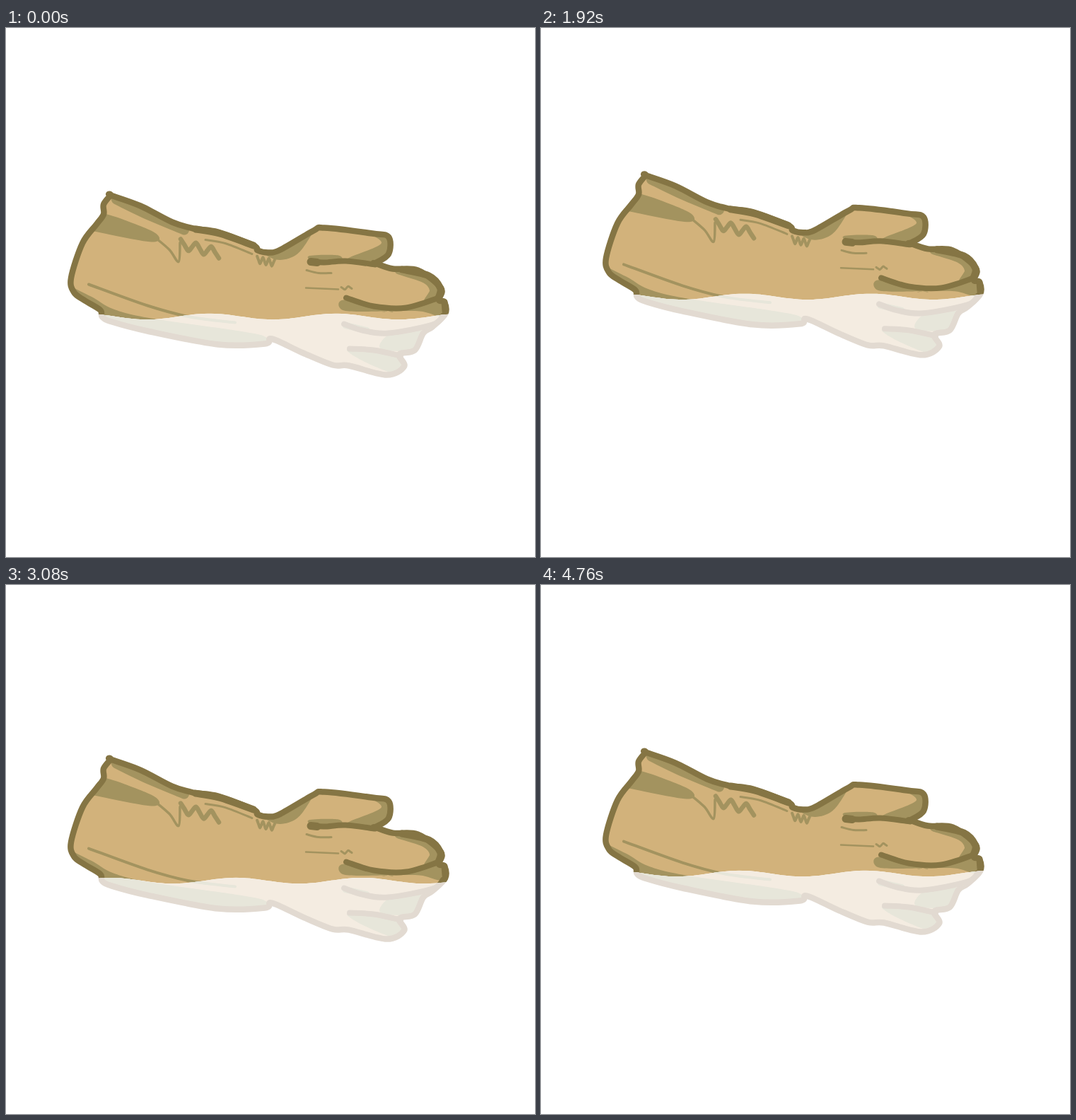
Write an HTML page that moves like this. It is 748x748 px and loops after 4800 ms.

```html
<!DOCTYPE html>
<html lang="en">
<head>
<meta charset="utf-8">
<title>Floating hand</title>
<style>
  html, body { margin: 0; width: 100%; height: 100%; overflow: hidden; background: #fff; }
  svg { display: block; width: 100%; height: 100%; }
  .dry { --skin: #d2b27b; --shade: #a3935f; --line: #857544; }
  .wet { --skin: #f4ece1; --shade: #e7e6da; --line: #e2dad1; }
  path { stroke-linecap: round; stroke-linejoin: round; }
</style>
</head>
<body>
<svg viewBox="0 0 748 748">
  <defs>
    <g id="hand"><g id="inside" clip-path="url(#body)"></g></g>
    <clipPath id="body"></clipPath>
    <clipPath id="water"><path id="surface"/></clipPath>
  </defs>
  <g id="float">
    <use href="#hand" class="dry"/>
    <g clip-path="url(#water)">
      <rect y="380" width="748" height="160" fill="#fff"/>
      <use href="#hand" class="wet"/>
    </g>
  </g>
</svg>
<script>
const LOOP = 4800, STEP = 40;
const WAVE = { length: 178, period: 960, crest: 288, level: 407.5, height: 4.2 };
// Bobbing: time, vertical offset
const BOB = [[0, 0.5], [1690, -29.5], [3460, 15.5], [4800, 0.5]];

const $ = id => document.getElementById(id);

// Smooth path through points; a repeated point makes a corner.
function curve(text, closed) {
  const p = text.trim().split(/\s+/).map(s => s.split(',').map(Number));
  const n = p.length;
  const at = i => closed ? p[(i + n) % n] : p[Math.max(0, Math.min(n - 1, i))];
  let d = 'M' + p[0];
  for (let i = 0; i < (closed ? n : n - 1); i++) {
    const [a, b, c, e] = [at(i - 1), at(i), at(i + 1), at(i + 2)];
    const c1 = b.map((v, k) => v + (c[k] - a[k]) / 6);
    const c2 = c.map((v, k) => v - (e[k] - b[k]) / 6);
    d += `C${c1} ${c2} ${c}`;
  }
  return d + (closed ? 'Z' : '');
}

function add(parent, d, fill, stroke, width) {
  const path = document.createElementNS('http://www.w3.org/2000/svg', 'path');
  path.setAttribute('d', d);
  path.style.fill = fill ? `var(--${fill})` : 'none';
  if (stroke) {
    path.style.stroke = `var(--${stroke})`;
    path.style.strokeWidth = width;
  }
  $(parent).append(path);
}
const shade = points => add('inside', curve(points, true), 'shade');
const brush = (width, points) => add('inside', curve(points), null, 'shade', width);
const ink = (width, points) => add('hand', curve(points), null, 'line', width);

// Wavy crease between two points
function crease(width, x0, y0, x1, y1, turns, height) {
  const points = [], count = turns * 4;
  for (let i = 0; i <= count; i++) {
    const u = i / count;
    points.push([x0 + (x1 - x0) * u, y0 + (y1 - y0) * u - height * Math.cos(Math.PI * i / 2)]);
  }
  brush(width, points.join(' '));
}

const arm = `136,408 133,398 110,384 96,373 92,353 108,304 128,277 138,263
  138,249 148,236 148,236 190,251 235,274 265,283 300,288 350,307`;
const fingers = `356,314 372,317 388,313 435,286 450,282 518,290 541,295 541,319
  522,332 522,332 547,340 582,342 615,367 612,384 620,387 621,404`;
const under = `603,422 590,431 578,455 556,461 563,478 538,490 485,477 462,476
  420,459 376,439 366,446 300,447 200,428 150,415`;
const outline = curve(`${arm} ${fingers} ${under}`, true);

add('body', outline, 'skin');
add('inside', outline, 'skin');

// Arm
brush(14, '156,242 195,261 252,285');
shade('136,261 136,261 165,270 212,290 206,302 124,287 124,287');
brush(3.5, '210,295 231,313 244,330 246,303');
crease(6.5, 247, 305, 301, 318, 2.5, 7);
brush(3, '282,299 310,304 348,319');
crease(4, 355, 327, 380, 332, 3, 5);
shade('88,366 120,379 152,397 205,410 330,428 368,437 366,452 200,436 120,404');
brush(4, '117,362 200,392 260,408 324,416');

// Palm and thumb
shade('352,310 352,310 382,327 412,319 435,287 435,287 385,312');
shade('518,291 530,305 484,325 484,333 526,330 548,318 544,292');
shade('428,322 470,321 472,330 440,332');
brush(3, '425,342 442,346 460,346');
brush(2.5, '424,367 470,369');
crease(3, 474, 368, 489, 366, 1.5, 2);

// Fingers
brush(14, '556,341 594,354 606,370 598,386');
shade('478,384 478,399 540,400 540,400');
shade('540,400 540,400 585,400 612,407 624,405 618,384');
brush(9, '480,420 510,427');
shade('543,432 585,427 588,436 578,455 530,453');
shade('482,454 520,456 556,463 562,478 550,488 506,471');

// Contours
add('hand', outline, null, 'line', 8.5);
ink(10, '268,284 302,290 350,307');
ink(8, '430,330 450,331 480,329 522,334');
ink(11, '431,330 440,331');
ink(10, '560,341 598,350 614,367 612,380');
ink(8, '481,381 520,393 566,395 612,381');
ink(9, '620,387 621,400');
ink(8, '478,418 504,427 540,431 603,419 618,406');
ink(8, '486,453 520,455 558,463');

function bob(t) {
  const i = BOB.findIndex((k, n) => n && t <= k[0]);
  const [t0, y0] = BOB[i - 1], [t1, y1] = BOB[i];
  return y0 + (y1 - y0) * (1 - Math.cos(Math.PI * (t - t0) / (t1 - t0))) / 2;
}

function surface(t) {
  const crest = WAVE.crest + WAVE.length * t / WAVE.period;
  let d = 'M60,560';
  for (let x = 60; x <= 660; x += 5) {
    const y = WAVE.level - WAVE.height * Math.cos(2 * Math.PI * (x - crest) / WAVE.length);
    d += `L${x},${y.toFixed(2)}`;
  }
  return d + 'L660,560Z';
}

const start = performance.now();
function draw(now) {
  const t = Math.floor(Math.max(0, now - start) % LOOP / STEP) * STEP;
  $('float').setAttribute('transform', `translate(0 ${bob(t).toFixed(2)})`);
  $('surface').setAttribute('d', surface(t));
  requestAnimationFrame(draw);
}
draw(start);
</script>
</body>
</html>
```
